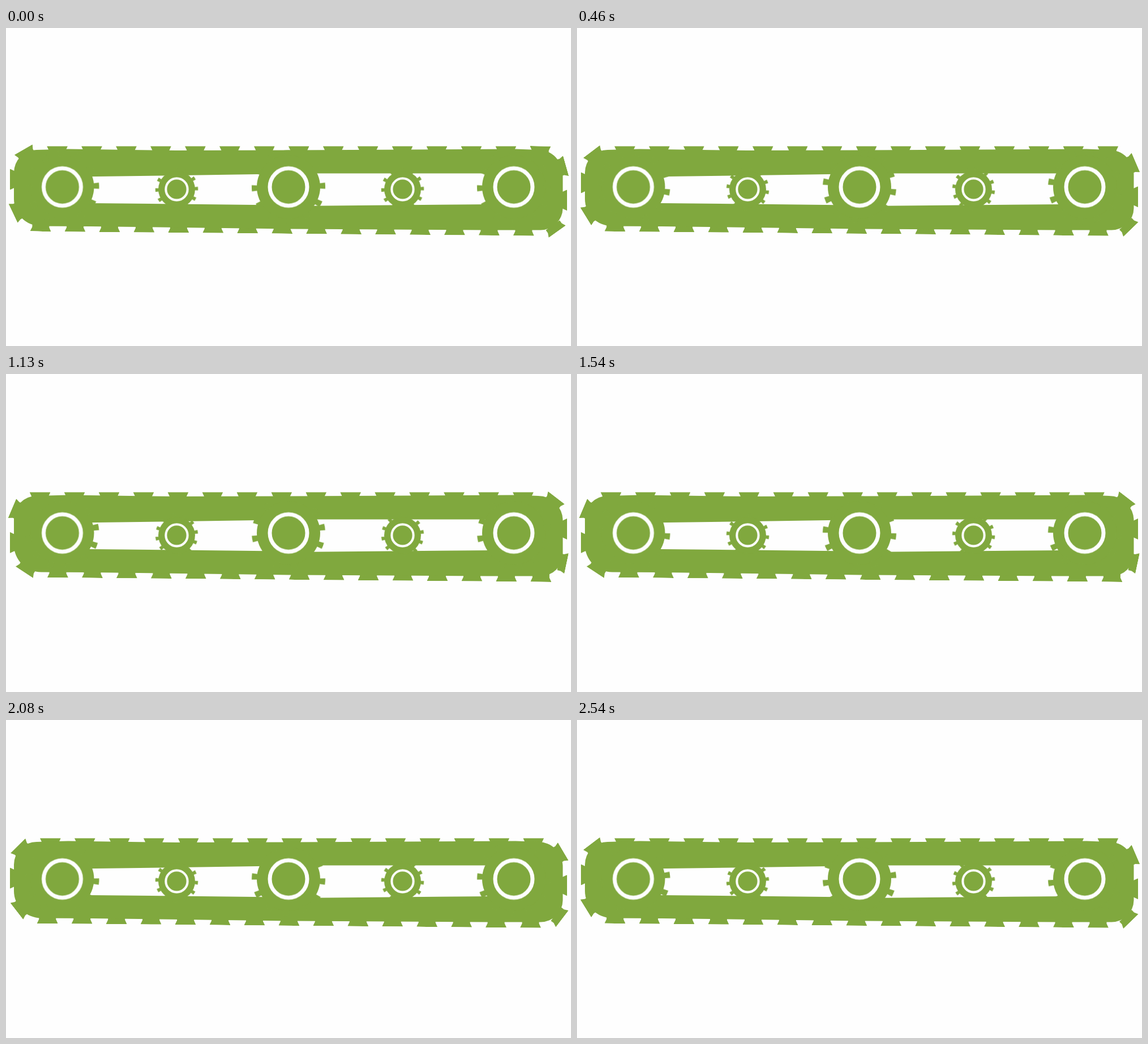
An HTML page without scripts for the animation above (2.58 s loop, 998 by 561 pixels).

```html
<!DOCTYPE html>
<html lang="en">
<head>
<meta charset="utf-8">
<title>Conveyor belt</title>
<style>
  @property --shift {
    syntax: "<number>";
    inherits: true;
    initial-value: 0;
  }
  :root { --green: #80a83e; --loop: 2580ms; }
  html, body { margin: 0; width: 100%; height: 100%; overflow: hidden; background: #fefefe; }
  .stage { position: relative; width: 998px; height: 561px; overflow: hidden; }
  svg { position: absolute; inset: 0; }

  /* 36 teeth hang from the outer track; the whole set advances six pitches per loop */
  .teeth { position: absolute; inset: 0; animation: advance var(--loop) infinite; }
  .teeth i {
    position: absolute; left: 0; top: 0; width: 37px; height: 14px;
    background: var(--green);
    clip-path: polygon(0 0, 100% 0, 33.5px 7.5px, 33.5px 100%, 3.5px 100%, 3.5px 7.5px);
    offset-path: path("M54 208.3 H943 A48 48 0 0 1 991 256.3 V325.8 A41 41 0 0 1 950 366.8 L63 359 A56 56 0 0 1 7 303 V255.3 A47 47 0 0 1 54 208.3 Z");
    offset-anchor: 50% 0;
    offset-rotate: auto;
    offset-distance: calc((var(--i) + var(--shift)) * 100% / 36);
  }
  @keyframes advance {
    0% { --shift: .6; }
    3.09% { --shift: .6; animation-timing-function: steps(60, end); }
    100% { --shift: 6.6; }
  }

  .green { fill: var(--green); }
  .hole { fill: #fefefe; }
  .ring { fill: none; stroke: #fefefe; stroke-width: 7; }
  .cogs {
    fill: none; stroke: var(--green); stroke-width: 11;
    stroke-dasharray: 10 20; stroke-dashoffset: 5;
    transform-origin: 0 0;
    animation: spin var(--loop) infinite;
  }
  @keyframes spin {
    0% { transform: rotate(-2deg); }
    3.09% { transform: rotate(-2deg); animation-timing-function: steps(60, end); }
    100% { transform: rotate(268deg); }
  }
</style>
</head>
<body>
<div class="stage">
  <div class="teeth">
    <i style="--i:0"></i><i style="--i:1"></i><i style="--i:2"></i><i style="--i:3"></i>
    <i style="--i:4"></i><i style="--i:5"></i><i style="--i:6"></i><i style="--i:7"></i>
    <i style="--i:8"></i><i style="--i:9"></i><i style="--i:10"></i><i style="--i:11"></i>
    <i style="--i:12"></i><i style="--i:13"></i><i style="--i:14"></i><i style="--i:15"></i>
    <i style="--i:16"></i><i style="--i:17"></i><i style="--i:18"></i><i style="--i:19"></i>
    <i style="--i:20"></i><i style="--i:21"></i><i style="--i:22"></i><i style="--i:23"></i>
    <i style="--i:24"></i><i style="--i:25"></i><i style="--i:26"></i><i style="--i:27"></i>
    <i style="--i:28"></i><i style="--i:29"></i><i style="--i:30"></i><i style="--i:31"></i>
    <i style="--i:32"></i><i style="--i:33"></i><i style="--i:34"></i><i style="--i:35"></i>
  </div>
  <svg width="998" height="561" viewBox="0 0 998 561">
    <path class="green" d="M54 215 L110 213.5 L300 216 L500 215.5 L900 213.5 L940 215 A43.5 43.5 0 0 1 983.5 258.5 V318 A39 39 0 0 1 944.5 356.5 L850 356.5 L500 354.5 L150 350 L62 349.5 A48 48 0 0 1 14 301.5 V255 A40 40 0 0 1 54 215 Z"/>
    <path class="hole" d="M120 262.5 L275 260.5 L460 257.8 V312.2 L120 308.7 Z M540 256.6 H860 V311 L540 313.8 Z"/>
    <g transform="translate(99.5 280.5)">
      <circle class="green" r="56"/>
      <circle class="cogs" r="59.5" pathLength="360"/>
      <circle class="ring" r="33"/>
    </g>
    <g transform="translate(499 280.5)">
      <circle class="green" r="56"/>
      <circle class="cogs" r="59.5" pathLength="360"/>
      <circle class="ring" r="33"/>
    </g>
    <g transform="translate(897 280.5)">
      <circle class="green" r="56"/>
      <circle class="cogs" r="59.5" pathLength="360"/>
      <circle class="ring" r="33"/>
    </g>
    <g transform="translate(301.5 284.5) scale(.58)">
      <circle class="green" r="56"/>
      <circle class="cogs" r="59.5" pathLength="360"/>
      <circle class="ring" r="33"/>
    </g>
    <g transform="translate(700.5 284.5) scale(.58)">
      <circle class="green" r="56"/>
      <circle class="cogs" r="59.5" pathLength="360"/>
      <circle class="ring" r="33"/>
    </g>
  </svg>
</div>
</body>
</html>
```
